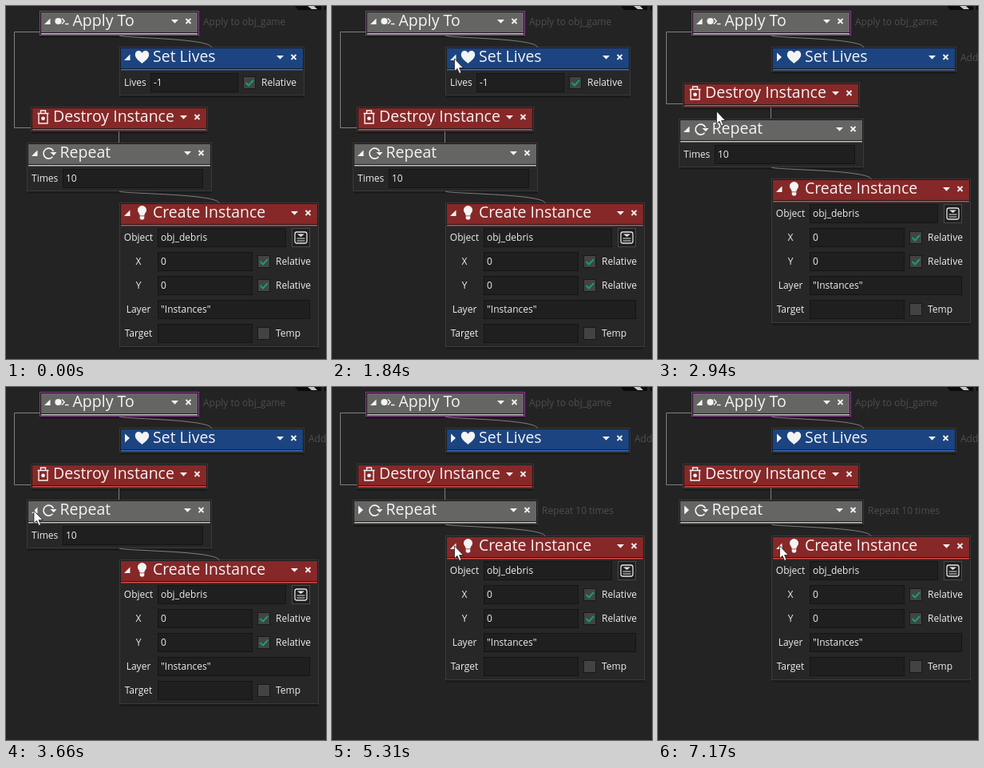
Write an HTML page that moves like this. It is 401 px wide and 442 px high and loops after 8000 ms.

```html
<!DOCTYPE html>
<html lang="en">
<head>
<meta charset="utf-8">
<title>Collapsing action blocks</title>
<style>
html, body { margin: 0; width: 100%; height: 100%; overflow: hidden; background: #232323; }
svg { display: block; width: 401px; height: 442px; font-family: "Open Sans", "Noto Sans", sans-serif; }
text { white-space: pre; }
</style>
</head>
<body>
<svg id="stage" viewBox="0 0 401 442"></svg>
<script>
const LOOP = 8000, STEP = 90;
const INK = '#f4f4f4', LINE = '#808080';
const stage = document.getElementById('stage');

function add(parent, tag, attrs, text) {
  const el = document.createElementNS('http://www.w3.org/2000/svg', tag);
  for (const key in attrs) el.setAttribute(key, attrs[key]);
  if (text) el.textContent = text;
  parent.appendChild(el);
  return el;
}
const rect = (p, x, y, width, height, fill, more) => add(p, 'rect', { x, y, width, height, fill, ...more });
const shape = (p, d, fill = INK) => add(p, 'path', { d, fill });
const stroke = (p, d, color = INK, width = 1.5) =>
  add(p, 'path', { d, fill: 'none', stroke: color, 'stroke-width': width });
const label = (p, x, y, text, size = 12, fill = '#eeeeee', anchor = 'start') =>
  add(p, 'text', { x, y, 'font-size': size, fill, 'text-anchor': anchor }, text);
const show = (el, on) => el.setAttribute('display', on ? 'inline' : 'none');

// Icons are drawn around their own centre.
const icons = {
  target(g) {
    add(g, 'circle', { cx: -4.5, cy: 0, r: 4.1, fill: INK });
    stroke(g, 'M0 -3.5L3.2 0L0 3.5M4 3.5H8.5', INK, 1.4);
  },
  heart(g) {
    shape(g, 'M0 8C-3 5 -8.7 1.8 -8.7 -3C-8.7 -8.7 -2 -9.5 0 -5C2 -9.5 8.7 -8.7 8.7 -3C8.7 1.8 3 5 0 8Z');
  },
  bin(g) {
    stroke(g, 'M-7 -4.5H7M-3 -5V-8H3V-5M-5.5 -4V8H5.5V-4', INK, 1.4);
    add(g, 'circle', { cx: 0, cy: 1.8, r: 2.4, fill: INK });
  },
  repeat(g) {
    stroke(g, 'M4.5 4.8A6.5 6.5 0 1 1 5.5 -2', INK, 1.6);
    shape(g, 'M1.5 -1H9.5L5.8 3.2Z');
  },
  bulb(g) {
    shape(g, 'M-2.8 3.5C-2.8 1 -5.6 -.5 -5.6 -3.4A5.6 5.6 0 0 1 5.6 -3.4C5.6 -.5 2.8 1 2.8 3.5Z');
    shape(g, 'M-2.8 4.3H2.8V7L1.5 8.6H-1.5L-2.8 7Z');
  }
};

function field(g, x, y, width, value) {
  rect(g, x + .5, y - 11.5, width - 1, 23, '#1f1f1f', { stroke: '#151515' });
  if (value) label(g, x + 4, y + 4, value);
}

function check(g, x, y, text, on) {
  rect(g, x + .5, y - 7.5, 15, 15, '#434343', { stroke: '#191919' });
  if (on) stroke(g, `M${x + 3.5} ${y}L${x + 7} ${y + 3.5}L${x + 13} ${y - 3}`, '#12a070', 2);
  label(g, x + 23, y + 4, text);
}

function listButton(g, x, y) {
  rect(g, x + .5, y - 11.5, 22, 23, '#1f1f1f', { stroke: '#4a4a4a' });
  rect(g, x + 4, y - 7, 15, 14, 'none', { rx: 2.5, stroke: '#e4e4e4', 'stroke-width': 1.3 });
  shape(g, `M${x + 7} ${y - 4.5}H${x + 16}L${x + 11.5} ${y - 1}Z`, '#e4e4e4');
  stroke(g, `M${x + 6.5} ${y + 1}H${x + 16.5}M${x + 6.5} ${y + 4}H${x + 16.5}`, '#e4e4e4', 1.2);
}

const tones = {
  grey: ['#656563', '#c6c6c6'],
  blue: ['#1c4480', '#3c70c8'],
  red: ['#872828', '#e04a48']
};

function block({ x, right, tone, icon, title, note, rows = 0, foldable = true, selected, fill }) {
  const g = add(stage, 'g', {}), left = Math.round(x), w = right - left;
  const [dark, light] = tones[tone];
  const shadow = rect(g, left, 0, w, 3, '#1b1b1b');
  const frame = rect(g, left - .5, -.5, w + 1, 30, '#272727', { stroke: selected ? '#8e3f92' : '#3a3a3a' });
  rect(g, left, 0, w, 29, '#1a1a1a');
  rect(g, left + 1, 1, w - 2, 25, dark);
  rect(g, left + 1, 27, w - 2, 1.5, light);

  const opened = shape(g, `M${left + 5} 16H${left + 12.5}V8.5Z`);
  const closed = shape(g, `M${left + 6} 6.5V17.5L${left + 12} 12Z`);
  const mark = add(g, 'g', { transform: `translate(${x + (foldable ? 27.5 : 14.5)} 12)` });
  icons[icon](mark);
  label(g, x + (foldable ? 41 : 27), 18, title, 19.5, INK);
  shape(g, `M${right - 34} 10H${right - 25}L${right - 29.5} 14.8Z`);
  stroke(g, `M${right - 15.5} 9L${right - 9.5} 15M${right - 9.5} 9L${right - 15.5} 15`, INK, 1.8);

  const remark = note && label(g, right + 6, 17, note, 12, '#4e4e4e');
  const body = add(g, 'g', {});
  if (fill) fill(body);

  return (top, open) => {
    const height = 30 + (open ? rows * 30 : 0);
    g.setAttribute('transform', `translate(0 ${top})`);
    frame.setAttribute('height', height);
    shadow.setAttribute('y', height);
    show(body, open);
    show(opened, foldable && open);
    show(closed, foldable && !open);
    if (remark) show(remark, !open || selected);
    return top + height + 15;
  };
}

rect(stage, 0, 0, 401, 442, '#232323');
shape(stage, 'M362 0H395V5H366Z', '#0b0b0b');
shape(stage, 'M378 0H386L390 4H383Z', '#c8c8c8');
rect(stage, 399, 0, 2, 5, '#0b0b0b');

const applyTo = block({
  x: 42.5, right: 241, tone: 'grey', icon: 'target', title: 'Apply To',
  note: 'Apply to obj_game', selected: true
});
const setLives = block({
  x: 143, right: 373, tone: 'blue', icon: 'heart', title: 'Set Lives', note: 'Add -1 to lives', rows: 1,
  fill(g) {
    label(g, 148, 48, 'Lives');
    field(g, 181, 44, 110, '-1');
    check(g, 297, 44, 'Relative', true);
  }
});
const destroy = block({
  x: 32, right: 252, tone: 'red', icon: 'bin', title: 'Destroy Instance', foldable: false
});
const repeat = block({
  x: 26.5, right: 257, tone: 'grey', icon: 'repeat', title: 'Repeat', note: 'Repeat 10 times', rows: 1,
  fill(g) {
    label(g, 32, 48, 'Times');
    field(g, 71, 44, 176, '10');
  }
});
const create = block({
  x: 143, right: 391, tone: 'red', icon: 'bulb', title: 'Create Instance', note: 'Create', rows: 5,
  fill(g) {
    const rows = [
      ['Object', 161, 'obj_debris'], ['X', 119, '0'], ['Y', 119, '0'],
      ['Layer', 191, '"Instances"'], ['Target', 119, '']
    ];
    rows.forEach(([name, width, value], i) => {
      const y = 43 + i * 30;
      label(g, 166, y + 4, name, 12, '#eeeeee', 'middle');
      field(g, 190, y, width, value);
    });
    listButton(g, 358, 43);
    check(g, 315, 73, 'Relative', true);
    check(g, 315, 103, 'Relative', true);
    check(g, 315, 163, 'Temp', false);
  }
});

const curve = (x, bottom) => `M142 ${bottom - 15}C142 ${bottom - 12} ${x} ${bottom - 12} ${x} ${bottom}`;
stroke(stage, curve(257.5, 52), LINE, 1);
const sideLine = stroke(stage, '', LINE, 1);
const dropLine = stroke(stage, '', LINE, 1);
const childLine = stroke(stage, '', LINE, 1);

const pointer = add(stage, 'path', {
  d: 'M.4 .8V16.8L4 13.4L6.6 19.4L9.1 18.4L6.6 12.6H11.6Z',
  fill: '#fff', stroke: '#111', 'stroke-width': .8
});

// Each move: start time, number of steps, end point.
const moves = [
  [840, 9, 154, 67], [1840, 1, 153, 65], [2490, 9, 45, 154], [3300, 3, 37, 154],
  [3660, 1, 34.5, 154], [4310, 4, 153, 215], [4670, 1, 158, 226], [4760, 4, 153, 198],
  [5960, 1, 152, 198]
];

function pointerAt(t) {
  let x = 178, y = 445;
  for (const [start, steps, toX, toY] of moves) {
    if (t < start) break;
    const u = Math.min(1, (Math.floor((t - start) / STEP) + 1) / steps);
    const k = u * u * (3 - 2 * u);
    x += (toX - x) * k;
    y += (toY - y) * k;
  }
  return [x, y];
}

function draw(t) {
  const livesOpen = t < 2120, repeatOpen = t < 3840;
  const createOpen = repeatOpen || (t >= 5310 && t < 6240) || t >= 7170;

  const livesTop = applyTo(7, true);
  const destroyTop = setLives(livesTop, livesOpen);
  const repeatTop = destroy(destroyTop, false);
  const createTop = repeat(repeatTop, repeatOpen);
  create(createTop, createOpen);

  sideLine.setAttribute('d', `M42 32.5H10.5V${destroyTop + 25.5}H31`);
  dropLine.setAttribute('d', `M141.5 ${repeatTop - 15}V${repeatTop - 1}`);
  childLine.setAttribute('d', curve(267, createTop));

  const [x, y] = pointerAt(t);
  pointer.setAttribute('transform', `translate(${x.toFixed(1)} ${y.toFixed(1)})`);
  show(pointer, t >= 840);
}

const begin = performance.now();
function tick() {
  draw((performance.now() - begin) % LOOP);
  requestAnimationFrame(tick);
}
tick();
</script>
</body>
</html>
```
